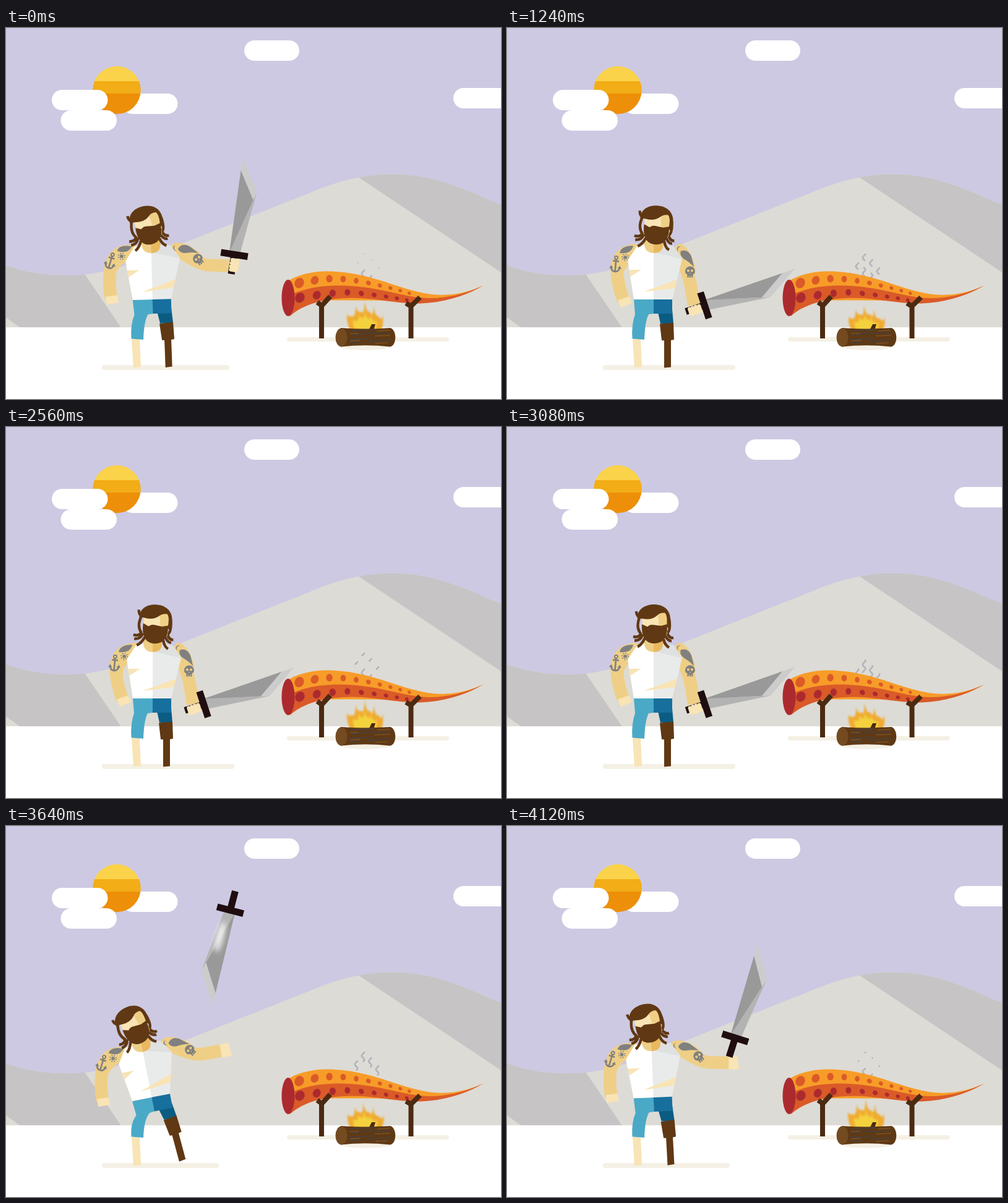
Recreate the animation shown at these times as an HTML page. Size 800 px wide and 600 px high, loop 4160 ms.

```html
<!DOCTYPE html>
<html lang="en">
<head>
<meta charset="utf-8">
<title>Sword toss</title>
<style>
html, body { margin: 0; width: 100%; height: 100%; overflow: hidden; background: #fff; }
svg { display: block; width: 100vw; height: 100vh; }
.skin { fill: #efcf86; }
.pale { fill: #f8e4b5; }
.ink { fill: #808080; }
.inkLine { fill: none; stroke: #808080; }
.hair { fill: #603813; }
.lock { fill: none; stroke: #603813; stroke-width: 4.4; }
.limb { fill: none; stroke: #efcf86; stroke-width: 20.5; }
.post { fill: none; stroke: #4c2a12; stroke-width: 8; }
</style>
</head>
<body>
<svg viewBox="0 0 800 600">
  <defs>
    <clipPath id="hillClip"><path d="M0,384 C45,400 95,404 140,397 C180,391 220,375 270,354.5 L490,267 C540,246 580,236.5 622,236.5 C690,236.5 735,258 800,286 V484 H0Z"/></clipPath>
    <clipPath id="sunClip"><circle cx="179" cy="100.5" r="38.8"/></clipPath>
    <filter id="soft" x="-30%" y="-30%" width="160%" height="160%"><feGaussianBlur stdDeviation="1.5"/></filter>
    <filter id="glow" x="-50%" y="-200%" width="200%" height="500%"><feGaussianBlur stdDeviation="4"/></filter>
  </defs>

  <rect width="800" height="600" fill="#cdc9e2"/>
  <g clip-path="url(#hillClip)">
    <rect width="800" height="484" fill="#dddbd5"/>
    <path fill="#c6c4c5" d="M0,370 H108 L187,486 H25 L0,468Z M569,241 V220 H800 V395Z"/>
  </g>
  <rect y="484" width="800" height="116" fill="#fff"/>

  <g fill="#fff">
    <rect x="385" y="20" width="89" height="33" rx="16.5"/>
    <rect x="723" y="97" width="90" height="33" rx="16.5"/>
    <rect x="188" y="106" width="89.5" height="33" rx="16.5"/>
  </g>
  <g clip-path="url(#sunClip)">
    <rect x="139" y="60" width="80" height="26" fill="#fad34b"/>
    <rect x="139" y="86" width="80" height="20" fill="#f2ad17"/>
    <rect x="139" y="106" width="80" height="36" fill="#ed8f08"/>
  </g>
  <g fill="#fff">
    <rect x="74" y="100" width="90.5" height="33" rx="16.5"/>
    <rect x="88.5" y="133" width="90.5" height="33" rx="16.5"/>
  </g>

  <g fill="#f5f0e5">
    <rect x="454" y="500" width="262" height="7" rx="3.5"/>
    <rect id="shade" x="155" y="545" width="214" height="8" rx="4"/>
    <ellipse cx="581" cy="515" rx="41" ry="6"/>
  </g>

  <path id="smoke" fill="none" stroke="#b4b3b9" stroke-width="2.6"/>
  <path fill="#f79c28" d="M456,409 C480,394 515,391 545,395 C605,402 640,425 690,431 C725,434 750,426 771,416.5 C745,432 710,440 690,441 L460,440Z"/>
  <path fill="#da5a28" d="M459,466 C478,448 512,437 560,436.5 C600,437 630,446 670,445.5 C710,444 745,432 771,416.5 C745,429 715,437 685,437 C640,436 610,419 545,416.5 C515,416 490,419 460,431Z"/>
  <ellipse cx="456" cy="436.5" rx="10.5" ry="29.5" fill="#ac2a2e"/>
  <g id="spotsTop" fill="#da5a28"></g>
  <g id="spotsLow" fill="#ac2a2e"></g>

  <g filter="url(#soft)">
    <path id="flame" fill="#f0ab30"/>
    <path id="core" fill="#f3d23c"/>
  </g>
  <path fill="#4c2a12" d="M586,489 L591,479 H597 L594,489Z"/>
  <path fill="#5f3914" d="M541,485 Q581,488 621,485 C632,488 632,513 621,515.5 Q581,511 541,515.5Z"/>
  <ellipse cx="542" cy="500.5" rx="9.5" ry="15" fill="#744a20"/>
  <path fill="none" stroke="#4b3f38" stroke-width="1.8" d="M556,490 L596,488 M558,497 L580,494 L620,493 M553,503 H575 L592,501 M584,507 L622,504 M556,509 L574,508"/>
  <path fill="none" stroke="#7d5124" stroke-width="1.5" d="M600,490 L620,489 M556,494 H570 M596,498 L621,497 M556,506 L572,505 M597,510 L617,509"/>
  <path class="post" d="M510,502 V447 M503,443.5 L510.5,449 L524,434"/>
  <path class="post" d="M654.5,502 V449 M646.5,445 L654.5,450 L669,435.5"/>

  <path id="armR" class="limb"/>
  <g id="upperR">
    <ellipse class="skin" cx="20" cy="-3.5" rx="30" ry="13"/>
    <path class="ink" d="M2,-3 C2,-14 12,-17 20,-15.5 L34,-13.5 Q23,-9 17,-4 Q9,2 2,-3Z"/>
    <path class="ink" d="M-4,-6 A4,4 0 1 0 1,0 A4,4 0 0 1 -4,-6Z"/>
    <g transform="translate(38,-5) rotate(-68)">
      <path class="ink" d="M-8,0 A8,8 0 1 1 8,0 Q8,4 4.500,5 V10 H-4.500 V5 Q-8,4 -8,0Z"/>
      <path class="skin" d="M-5,-1 a2,2 0 1 0 4,0 a2,2 0 1 0 -4,0Z M1,-1 a2,2 0 1 0 4,0 a2,2 0 1 0 -4,0Z M-1,4 L0,2 L1,4Z M-2.3,7 h1 v3 h-1Z M1.3,7 h1 v3 h-1Z"/>
    </g>
  </g>
  <path id="palm" class="pale" d="M-1,-10.5 H13 L16,11 H-1Z"/>

  <g id="armL">
    <path class="limb" d="M209,359 C186,362 175,375 178,398 Q180,420 188.5,441"/>
    <path class="skin" d="M213,350 Q185,348 173,368 Q166,382 168,400 L188,400 Q189,388 204,374Z"/>
    <path class="pale" d="M179,440.5 L197,434 L202,445 L184,452.5Z"/>
    <path class="ink" d="M182,364 Q184,352 204,352 Q201,366 182,364Z"/>
    <circle class="ink" cx="191" cy="371" r="2.8"/>
    <circle class="inkLine" cx="191" cy="371" r="4.9" stroke-width="2.4" stroke-dasharray="1.3 2.55"/>
    <g transform="translate(175.5,382) rotate(5)" class="inkLine" stroke-width="2.6">
      <circle cy="-10.5" r="2.5" stroke-width="2"/>
      <path d="M0,-8 V12 M-5,-5 H5 M-7,5 Q-6,12 0,12 Q6,12 7,5"/>
      <path class="ink" stroke="none" d="M-10,7 L-7,2 L-3.500,7Z M10,7 L7,2 L3.500,7Z"/>
    </g>
  </g>

  <path class="pale" d="M203,503 H216 L218,548 L206,549.5Z"/>
  <g id="legR">
    <path fill="#0b5c83" d="M243,455 H267 L269,478 H248Z"/>
    <path class="hair" d="M247,478.5 L269,476.5 L270,504 L265,505 V548.500 L254,549.5 V505.500 L250,505Z"/>
  </g>
  <path id="shorts" fill="#4aa9c7"/>
  <g id="torso">
    <path fill="#176f9d" d="M237,438 H267 V462 H237Z"/>
    <path fill="#fff" d="M195,376 L210,353 L222,350 L238,362 V439 H205Z"/>
    <path fill="#e9ebeb" d="M237,358 L252,351 L268,352 L283,373 L267,439 H237Z"/>
    <path fill="#dfe0e0" d="M239,363 L254,352 L268,352 L283,374Z"/>
    <path class="pale" d="M197,391 H217 L199.5,402Z M221,426.5 L275,407 L271,421Z"/>
    <path class="skin" d="M222,338 H238 V364 Q224,364 222,352Z"/>
    <path fill="#e9b95f" d="M237,338 H252 V352 Q251,364 237,364Z"/>
  </g>
  <g id="head">
    <path class="lock" d="M216,309 Q209,306 209,298 M214,308 Q208,324 216,334 Q214,341 204,339 M219,335 Q217,345 206,345.5 M223,341 Q218,352 211,355.5 M262,310 Q265,329 259,333 Q262,342 269,341 M256,338 Q260,346 266,346 M253,343 Q255,353 262,356.5"/>
    <path class="pale" d="M218,304 H249 V335 H219Z"/>
    <path class="skin" d="M243,301 L259,297 V335 H248Z"/>
    <path class="hair" d="M211,311 C209,296 222,287 238,287 C255,287 264,298 264,311 Q265,320 262,326 L258,323 Q260,305 255,300.5 Q247,300 243,304.5 Q234,313 219,310 Q214,309 211,311Z"/>
    <path class="hair" d="M218,319 L227,323 Q231,319 236,320 L249,321.5 L258.500,319 C261,340 252,350 238,350 C225,350 217,340 218,319Z"/>
  </g>

  <g id="sword">
    <path fill="#999" d="M4,-8.500 L136,-10.8 L92,16.5 L4,-7Z"/>
    <path fill="#b3b3b3" d="M4,-8 L92,16.5 L105.500,20.3 L4,9Z"/>
    <path fill="#ccc" d="M136,-10.8 L157,-11.2 L105.500,20.3 L91.7,16.5Z"/>
    <ellipse id="shine" cx="46" cy="5" rx="25" ry="5.5" fill="#fff" filter="url(#glow)"/>
    <path fill="#1f0d10" d="M-5.500,-22 H5.500 V22 H-5.500Z M-32,-5.500 H0 V5.500 H-32Z"/>
    <g id="fist" class="pale">
      <path d="M-28,-2 H-6 V8 Q-7,10 -10,10 H-25 Q-28,9 -28,6Z"/>
      <circle cx="-25" cy="-2" r="2.9"/><circle cx="-19.7" cy="-2.5" r="2.9"/>
      <circle cx="-14.3" cy="-2.5" r="2.9"/><circle cx="-9" cy="-2" r="2.9"/>
    </g>
  </g>
</svg>
<script>
const LOOP = 4160, STEP = 40, WINDUP = 3080, RELEASE = 3350, GRAB = 4140;
const $ = id => document.getElementById(id);
const put = (id, attr, value) => $(id).setAttribute(attr, value);
const dir = deg => [Math.cos(deg * Math.PI / 180), Math.sin(deg * Math.PI / 180)];
const along = (p, d, n) => [p[0] + d[0] * n, p[1] + d[1] * n];
const mix = (a, b, k) => a + (b - a) * k;
const part = (from, to, t) => Math.min(1, Math.max(0, (t - from) / (to - from)));
const ease = (from, to, t) => {
  const s = part(from, to, t);
  return s * s * (3 - 2 * s);
};

// the whole pose follows from how far the arm is up, the body thrown back and the weight shifted
function poseAt(t) {
  const late = t < WINDUP ? t + LOOP : t;
  const lift = 1 - ease(0, 560, t) + ease(WINDUP, RELEASE, t);
  const toss = ease(WINDUP, 3420, late) - ease(3640, 4320, late);
  const sway = ease(1140, 1720, t) - ease(1720, 2700, t);
  const look = (1 - lift) * (1 - sway) * (1 - ease(2800, WINDUP, t));
  const flight = part(RELEASE, LOOP, t);
  return {
    lean: sway - 11 * toss,
    head: 6 * look + sway - 9 * lift - 13 * toss,
    left: 12 * lift,
    leg: -15 * toss,
    upper: mix(68, 31, lift) + 3 * sway - 11 * toss,
    fore: mix(81, 3, lift) + 6 * sway - 13 * toss,
    spin: mix(-18.4, -81, lift) + 5 * sway - 360 * flight * (1.55 - .55 * flight),
    shade: 214 - 5 * lift - 20 * toss
  };
}

function torsoPoint(x, y, lean) {
  const [c, s] = dir(lean), u = x - 236, v = y - 439;
  return [236 + lean * .136 + u * c - v * s, 439 + u * s + v * c];
}

function armAt(pose) {
  const shoulder = torsoPoint(277, 360, pose.lean);
  const u = dir(pose.upper), f = dir(pose.fore);
  const elbow = along(shoulder, u, 50), wrist = along(elbow, f, 42);
  const grip = along(along(along(wrist, f, 9), dir(pose.spin), 18), dir(pose.spin + 90), -3);
  return { shoulder, elbow, wrist, u, f, grip };
}

const thrown = armAt(poseAt(RELEASE)).grip, caught = armAt(poseAt(LOOP)).grip;

function drawFigure(t) {
  const pose = poseAt(t), arm = armAt(pose);
  const at = (x, y) => torsoPoint(x, y, pose.lean);
  const turn = (id, x, y, angle) => {
    const [px, py] = at(x, y);
    put(id, 'transform', `translate(${px - x},${py - y}) rotate(${angle},${x},${y})`);
  };
  turn('torso', 236, 439, pose.lean);
  turn('head', 237, 355, pose.head);
  turn('armL', 203, 360, pose.left);
  turn('legR', 256, 452, pose.leg);
  put('shade', 'width', pose.shade);
  put('shorts', 'd', `M${at(205, 439)} L${at(237.3, 439)} L${at(237.3, 462)} L${at(229, 463)} Q223,474 222,504 L202.5,502.5 Q201,480 ${at(207, 463)}Z`);

  put('armR', 'd', `M${arm.shoulder} L${along(arm.elbow, arm.u, -14)} Q${arm.elbow} ${along(arm.elbow, arm.f, 14)} L${arm.wrist}`);
  put('upperR', 'transform', `translate(${arm.shoulder}) rotate(${pose.upper})`);
  put('palm', 'transform', `translate(${arm.wrist}) rotate(${pose.fore})`);

  const held = t < RELEASE || t >= GRAB, k = part(RELEASE, GRAB, t);
  const pos = held ? arm.grip
    : [mix(thrown[0], caught[0], k), mix(thrown[1], caught[1], k) - 234 * 4 * k * (1 - k)];
  put('sword', 'transform', `translate(${pos}) rotate(${pose.spin})`);
  put('fist', 'visibility', held ? 'visible' : 'hidden');
  put('palm', 'visibility', held ? 'hidden' : 'visible');
  put('shine', 'opacity', Math.max(0, 1 - Math.abs(t - 3640) / 180) * .9);
}

// five tongues, tallest in the middle, that sink and lean left once per flicker
function drawFire(t) {
  const sink = (1 - Math.cos(t / LOOP * 5 * 2 * Math.PI)) / 2;
  const height = i => (48 - 7 * Math.abs(i) - 2 * i * i) * (1 - .16 * sink);
  const outline = size => {
    const at = (x, h) => `${580 + x * size},${488 - h * size}`;
    let d = 'M' + at(-24, 0);
    for (let i = -2; i <= 2; i++) {
      const x = 14.5 * i - 3 * sink * Math.cos(i), h = height(i);
      const dip = i < 2 ? (h + height(i + 1)) * .34 : 0;
      const gap = i < 2 ? 14.5 * i + 7.5 : 24;
      d += `Q${at(x - 1, h * .45)} ${at(x, h)} Q${at(x + 2, dip * .9)} ${at(gap, dip)}`;
    }
    return d + 'Z';
  };
  put('flame', 'd', outline(1));
  put('core', 'd', outline(.66));
}

// each puff climbs four wavy strands, then leaves them from below
const PUFF_STARTS = [650, 2100, 3700];
const WISPS = [[566, 379], [577, 365], [588.5, 374], [600, 387]];

function drawSmoke(t) {
  let d = '';
  for (const start of PUFF_STARTS) {
    const age = (t - start + LOOP) % LOOP;
    const top = part(0, 1400, age), low = part(810, 2090, age);
    if (top - low < .01) continue;
    for (const [x, y] of WISPS) {
      for (let k = 0; k <= 20; k++) {
        const drop = 38 * (1 - mix(low, top, k / 20));
        d += `${k ? 'L' : 'M'}${x + 2.2 * Math.cos(drop / 13 * 2 * Math.PI)},${y + drop}`;
      }
    }
  }
  put('smoke', 'd', d);
}

// suckers shrink and crowd together towards the tip
function addSpots(id, count, xAt, yAt) {
  for (let i = 0; i < count; i++) {
    const x = xAt(i), r = 2 + 6 * Math.exp(-i / 4);
    const tilt = x < 510 ? 30 : x > 570 ? -50 : 0;
    $(id).innerHTML += `<ellipse rx="${r * .92}" ry="${r * 1.08}" transform="translate(${x},${yAt(x)}) rotate(${tilt})"/>`;
  }
}
addSpots('spotsTop', 10, i => 474 + 25.6 * i - .65 * i * i, x => 405 + 24 * (Math.abs(x - 530) / 122) ** 1.5);
addSpots('spotsLow', 9, i => 475 + 28 * i - .8 * i * i, x => 427.5 + 12 * (Math.abs(x - 550) / 95) ** 1.4);

const start = performance.now();
function frame(now) {
  const t = Math.floor(Math.max(0, now - start) % LOOP / STEP) * STEP;
  drawFigure(t);
  drawFire(t);
  drawSmoke(t);
  requestAnimationFrame(frame);
}
frame(start);
</script>
</body>
</html>
```
